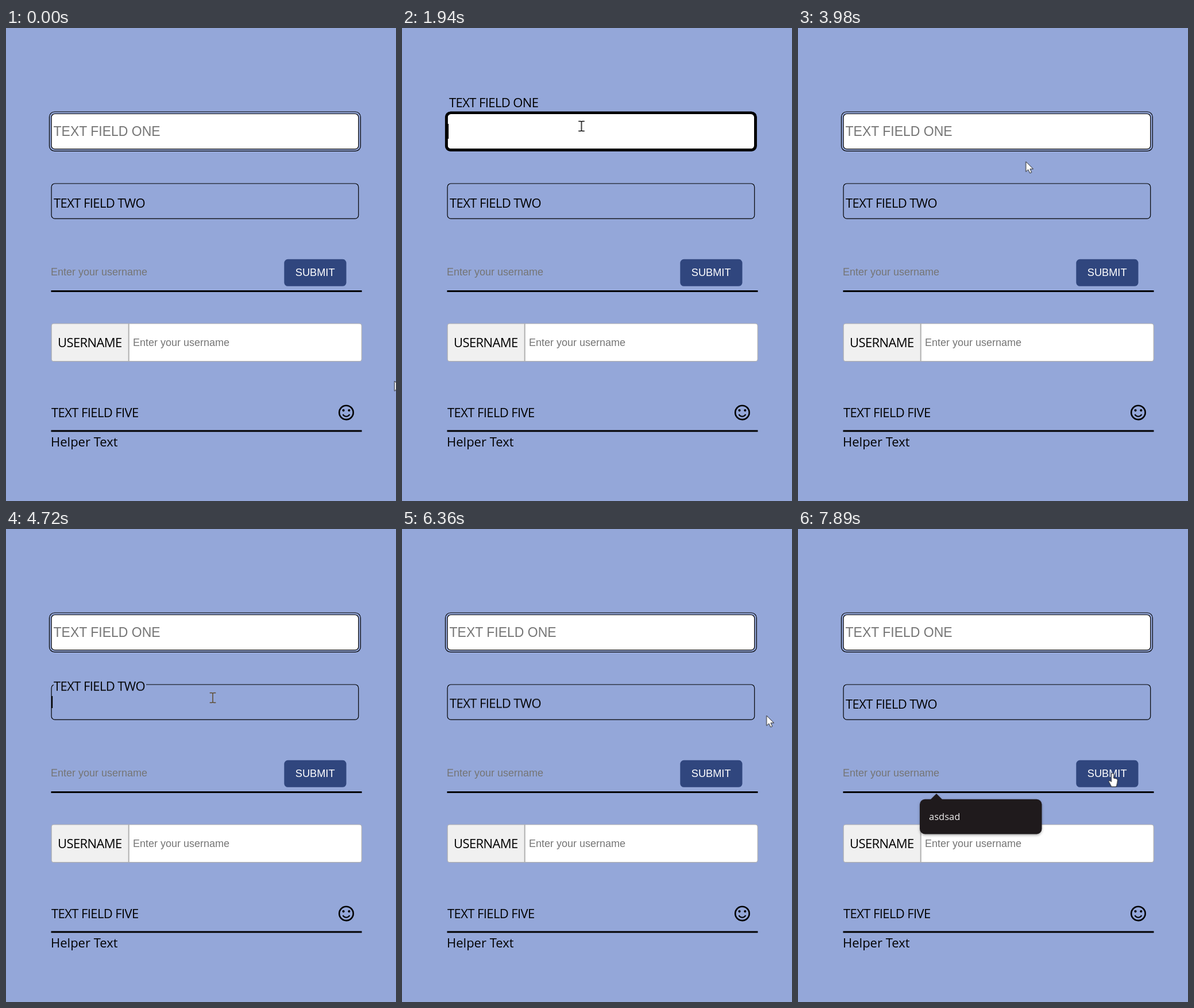
Write an HTML page that moves like this. It is 679 px wide and 824 px high and loops after 8000 ms.

```html
<!DOCTYPE html>
<html lang="en">
<head>
<meta charset="utf-8">
<title>Text fields</title>
<style>
  html, body { margin: 0; width: 100%; height: 100%; overflow: hidden; background: #94a7d9; }
  svg { display: block; width: 679px; height: 824px; }

  .label { font: 22px "Open Sans", "Noto Sans", sans-serif; }
  .caps { letter-spacing: -.6px; }
  .input { font: 18px "Liberation Sans", Arial, sans-serif; fill: #757575; }
  .line { stroke: #000; stroke-width: 2.8; }
  .outline { fill: none; stroke: #000; }

  /* Percentages are milliseconds / 80 */
  .move { animation: 8s linear infinite; }
  .toggle { animation: 8s step-end infinite; }

  #label-one { animation-name: label-one, label-one-color; animation-duration: 8s;
    animation-timing-function: linear, step-end; animation-iteration-count: infinite; }
  @keyframes label-one {
    0% { transform: translateY(50px); }
    21.375% { transform: translateY(50px); animation-timing-function: ease; }
    24.25%, 42.24% { transform: none; }
    42.25% { transform: translateY(6px); animation-timing-function: ease-out; }
    46%, 100% { transform: translateY(50px); }
  }
  @keyframes label-one-color {
    0%, 42.25% { fill: #7f7f7f; }
    21.375% { fill: #000; }
  }
  #placeholder-one { animation-name: placeholder-one; }
  @keyframes placeholder-one { 0%, 42.25% { opacity: 1; } 21.375% { opacity: 0; } }
  #focus-one { animation-name: focus-one; }
  @keyframes focus-one { 0%, 43.125% { opacity: 0; } 21.375% { opacity: 1; } }
  #caret-one { animation-name: caret-one; }
  @keyframes caret-one { 0%, 26.875%, 40.125% { opacity: 0; } 21.375%, 33.5% { opacity: 1; } }

  #label-two { animation-name: label-two; }
  @keyframes label-two {
    0% { transform: none; }
    57.25% { transform: none; animation-timing-function: ease; }
    61% { transform: translateY(-40.5px); }
    76.625% { transform: translateY(-40.5px); animation-timing-function: ease; }
    80.375%, 100% { transform: none; }
  }
  #caret-two { animation-name: caret-two; }
  @keyframes caret-two { 0%, 63.875%, 76.625% { opacity: 0; } 57.25%, 70.5% { opacity: 1; } }

  #caret-three { animation-name: caret-three; }
  @keyframes caret-three { 0%, 96.25% { opacity: 0; } 89.625% { opacity: 1; } }
  #suggestions { animation-name: suggestions; filter: drop-shadow(0 2px 2px #0005); }
  @keyframes suggestions { 0% { opacity: 0; } 90.375%, 100% { opacity: 1; } }

  #cursor { animation-name: cursor; }
  @keyframes cursor {
    0%, .874% { transform: translate(676.5px, 615px); }
    .875%, 5.375% { transform: translate(637px, 470px); }
    7.125% { transform: translate(600px, 490px); }
    8.75% { transform: translate(520px, 440px); }
    10.625% { transform: translate(420px, 300px); }
    12.5% { transform: translate(350px, 180px); }
    13.5% { transform: translate(325px, 154px); }
    14.625% { transform: translate(318px, 168px); }
    16.375%, 33.5% { transform: translate(312.5px, 171px); }
    40.375%, 45% { transform: translate(475.5px, 87px); }
    51.5% { transform: translate(368px, 286px); }
    53.375%, 61.875% { transform: translate(360px, 294px); }
    66.5% { transform: translate(567px, 300px); }
    70.875%, 78.75% { transform: translate(664px, 308px); }
    82.5% { transform: translate(520px, 392px); }
    86% { transform: translate(374.5px, 426.5px); }
    86.75%, 92.75% { transform: translate(372px, 426px); }
    98.625%, 100% { transform: translate(547.5px, 426px); }
  }
  #arrow { animation-name: arrow; }
  @keyframes arrow {
    0%, 9.25%, 11.075%, 35.75%, 49.06%, 67.9% { opacity: 1; }
    8.16%, 10.2%, 11.96%, 46.9%, 50.9%, 83.6% { opacity: 0; }
  }
  #beam { animation-name: beam; }
  @keyframes beam {
    0%, 9.25%, 11.075%, 35.75%, 49.06%, 67.9%, 96.5% { opacity: 0; }
    8.16%, 10.2%, 11.96%, 46.9%, 50.9%, 83.6% { opacity: 1; stroke: #000; }
    59% { opacity: 1; stroke: #5c4a2c; }
    60% { opacity: 1; stroke: #000; }
    89.625% { opacity: 1; stroke: #8f7417; }
    90.375% { opacity: 1; stroke: #000; }
  }
  #hand { animation-name: hand; }
  @keyframes hand { 0% { opacity: 0; } 96.5%, 100% { opacity: 1; } }
  #click { animation-name: click; }
  @keyframes click {
    0%, 22.25%, 44%, 59%, 78.375%, 90.375% { opacity: 0; }
    18.75%, 42.25%, 57.25%, 76.625%, 89.625% { opacity: .48; }
  }
</style>
</head>
<body>
<svg viewBox="0 0 679 824">
  <rect width="679" height="824" fill="#94a7d9"/>

  <g>
    <text id="label-one" class="label caps" x="82" y="138">TEXT FIELD ONE</text>
    <rect x="79.1" y="149.5" width="534.6" height="61.4" rx="6" fill="#fff" stroke="#000" stroke-width="1.2"/>
    <rect class="outline" x="75.5" y="146" width="541.8" height="68.4" rx="9" stroke-width="1.2"/>
    <rect id="focus-one" class="outline toggle" x="77.4" y="147.9" width="537.8" height="64.4" rx="7" stroke-width="4.4"/>
    <text id="placeholder-one" class="input toggle" style="font-size:23px" x="82.5" y="188">TEXT FIELD ONE</text>
    <rect id="caret-one" class="toggle" x="78.5" y="167" width="2.6" height="26"/>
  </g>

  <g>
    <rect class="outline" x="79.1" y="271" width="534.6" height="61.2" rx="6" stroke-width="1.2"/>
    <g id="label-two" class="move">
      <rect x="83" y="288" width="161" height="33" fill="#94a7d9"/>
      <text class="label caps" x="83" y="312.5">TEXT FIELD TWO</text>
    </g>
    <rect id="caret-two" class="toggle" x="79" y="291" width="2.2" height="21"/>
  </g>

  <g>
    <text class="input" x="78" y="431">Enter your username</text>
    <path class="line" d="M78.5 458.5H619.5"/>
    <rect x="484.3" y="402.8" width="108.2" height="47" rx="6.5" fill="#30467e"/>
    <text class="input" style="font-size:18.2px;fill:#fff" x="538.2" y="432" text-anchor="middle">SUBMIT</text>
    <rect id="caret-three" class="toggle" x="78.6" y="415.5" width="1.7" height="20"/>
  </g>

  <g>
    <rect x="79.2" y="515" width="540" height="65.7" rx="4" fill="#fff"/>
    <path d="M213.5 515H83.2a4 4 0 0 0-4 4v57.7a4 4 0 0 0 4 4H213.5Z" fill="#f0f0f0"/>
    <path d="M213.7 515V580.7" stroke="#b0b0b0" stroke-width="2"/>
    <rect x="79.2" y="515" width="540" height="65.7" rx="4" fill="none" stroke="#b0b0b0" stroke-width="1.2"/>
    <text class="label caps" x="90" y="556">USERNAME</text>
    <text class="input" x="221" y="554">Enter your username</text>
  </g>

  <g>
    <text class="label caps" x="79" y="678">TEXT FIELD FIVE</text>
    <path class="line" d="M78.5 702H619.5"/>
    <text class="label" x="78" y="729">Helper Text</text>
    <g transform="translate(592.4 669.9)">
      <circle class="outline" r="12.2" stroke-width="2.6"/>
      <circle cx="-4.9" cy="-3.8" r="2.1"/>
      <circle cx="4.9" cy="-3.8" r="2.1"/>
      <path class="outline" d="M-6 3.2Q-3.6 6.8 0 6.8T6 3.2" stroke-width="2"/>
    </g>
  </g>

  <g id="suggestions" class="toggle">
    <path d="M230.5 471.5L241 461L251.5 471.5Z" fill="#1f1a1c"/>
    <rect x="212" y="470.8" width="212.5" height="60.7" rx="9" fill="#1f1a1c"/>
    <text x="228" y="507" font-family="Open Sans, Noto Sans, sans-serif" font-size="16.5" font-weight="500" fill="#f0eeee">asdsad</text>
  </g>

  <g id="cursor" class="move">
    <path id="arrow" class="toggle" d="M0 0V17.5L4 13.8L7 20L10 18.6L7.2 12.8H12.8Z" fill="#fff" stroke="#222" stroke-width="1"/>
    <path id="beam" class="toggle" d="M-5.3-8.6H-1.5L0-7.8L1.5-8.6H5.3M0-7.8V7.8M-5.3 8.6H-1.5L0 7.8L1.5 8.6H5.3" fill="none" stroke="#000" stroke-width="1.5"/>
    <path id="hand" class="toggle" d="M-2 1.5Q-2-.5 0-.5T2 1.5V8L7 9Q9 9.5 9 12L8 18Q7.6 20 6.5 23H-2Q-3 20-4 18.5L-6.5 14Q-6 11-3.5 13L-2 14.5Z" fill="#fff" stroke="#222" stroke-width="1"/>
    <circle id="click" class="toggle" cx="-1.2" cy="-.8" r="16.2" fill="#ff0"/>
  </g>
</svg>
</body>
</html>
```
